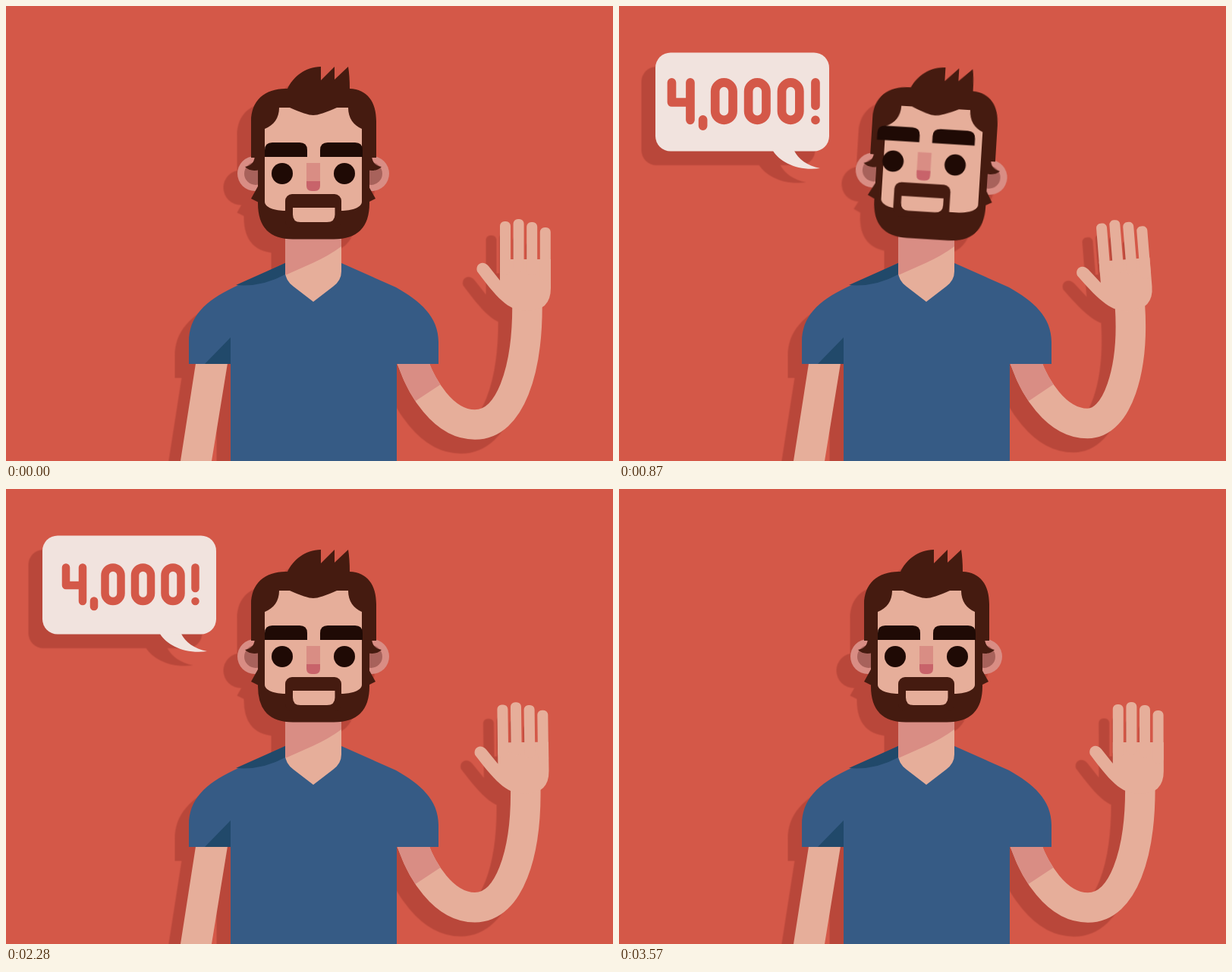
An HTML page that plays this animation: 800x600 px, repeating every 3600 ms.

```html
<!DOCTYPE html>
<html lang="en">
<head>
<meta charset="utf-8">
<title>Waving man</title>
<style>
  html, body { margin: 0; width: 100%; height: 100%; overflow: hidden; background: #d45848; }
  svg { display: block; width: 800px; height: 600px; }
  .skin { fill: #e6ae9a; }
  .shade { fill: #d98d84; }
  .hair { fill: #451b10; }
  .dark { fill: #1f0a05; }
  .shirt { fill: #365b85; }
  .fold { fill: #21496a; }
  .paper { fill: #f1e3de; }
  .line { fill: none; stroke: #e6ae9a; stroke-width: 39.5; }
  #armShade { stroke: #d98d84; stroke-dasharray: 61 999; }
  #label { fill: none; stroke: #d45848; stroke-width: 10.5; stroke-linecap: round; stroke-linejoin: round; }
</style>
</head>
<body>
<svg viewBox="0 0 800 600">
  <defs>
    <filter id="cast" filterUnits="userSpaceOnUse" x="0" y="0" width="800" height="600" color-interpolation-filters="sRGB">
      <feDropShadow dx="-18.5" dy="18.5" stdDeviation="0" flood-color="#b9473a"/>
    </filter>
    <g id="ear">
      <circle class="shade" cx="328" cy="221" r="23"/>
      <circle cx="329" cy="221" r="15" fill="#a8625b"/>
      <path class="hair" d="M334 194V216Q322 219 315 212Q328 210 328 196ZM333 236L323 254L333 259Z"/>
    </g>
    <path id="brow" class="dark" d="M341 199V190Q341 180 351 180H387Q397 180 397 190V199Z"/>
    <circle id="eye" class="dark" r="14"/>
    <rect id="zero" x="130.5" y="103.5" width="21" height="44.5" rx="10.5"/>
  </defs>

  <g filter="url(#cast)">
    <path id="tail" class="paper" d="M203 188V191C212 206 236 218 265 214C248 211 236 201 231 191V188Z"/>
    <rect id="box" class="paper" x="48" y="61.5" width="229" height="130" rx="20"/>
    <g id="label" role="img" aria-label="4,000!">
      <path d="M79 103.5V127H101M101 103.5V148M116 147.5V155M249.5 103.5V131M249.5 148V148.1"/>
      <use href="#zero"/>
      <use href="#zero" x="39.5"/>
      <use href="#zero" x="79"/>
    </g>

    <path id="arm" class="line"/>
    <path id="armShade" class="line"/>
    <g id="hand" class="skin">
      <path d="M651 334H718V372Q718 402 687 402C665 402 652 392 621 350C618 341 628 334 636 343L651 362Z"/>
    </g>

    <path class="skin" d="M251 465H293L271 600H230Z"/>
    <path class="shirt" d="M368 339L300 371C262 389 241 410 241 443V472H296V600H515V472H570V443C570 410 546 389 514 371L442 339Z"/>
    <path class="fold" d="M262 472L296 437V472ZM303 368L368 339V354Q337 371 303 368Z"/>
    <path class="skin" d="M368 290H442V350Q442 362 431 370L405 390L379 370Q368 362 368 350Z"/>
    <path class="shade" d="M368 290H442V317Q426 329 404 339L368 355Z"/>

    <g id="head">
      <use href="#ear"/>
      <use href="#ear" transform="matrix(-1 0 0 1 810 0)"/>
      <path class="hair" d="M323 200V152C323 124 342 108 371 109C378 94 394 80 415 80V98L433 80V97L451 80Q453 92 453 109C476 110 488 126 488 152V200H479V260Q479 307.5 432 307.5H378Q332 307.5 332 260V200Z"/>
      <path class="skin" d="M360 134H374Q396 144 405 144Q414 144 436 134H451C451 148 458 157 469 162V258C469 266 455 270 442 270H368C355 270 341 266 341 258V162C353 157 360 148 360 134Z"/>
      <g id="face">
        <path class="shade" d="M396 207H414V235H396Z"/>
        <path fill="#c8636a" d="M396 231H414V237Q414 244 407 244H403Q396 244 396 237Z"/>
        <g id="eyes">
          <use href="#eye" x="364"/>
          <use href="#eye" x="446"/>
        </g>
        <rect class="hair" x="368" y="248" width="74" height="45" rx="9"/>
        <path class="skin" d="M378 266H433.5V275Q433.5 285 423 285H388Q378 285 378 275Z"/>
        <g id="brows">
          <use href="#brow"/>
          <use href="#brow" transform="matrix(-1 0 0 1 811 0)"/>
        </g>
      </g>
    </g>
  </g>
</svg>

<script>
  const LOOP = 3600, WAVE = LOOP / 3;
  const $ = id => document.getElementById(id);
  const move = (id, value) => $(id).setAttribute('transform', value);
  const scaleAt = (x, y, s) => `translate(${x} ${y}) scale(${s}) translate(${-x} ${-y})`;

  const ease = p => (1 - Math.cos(Math.PI * Math.min(1, Math.max(0, p)))) / 2;
  const rise = (t, from, to) => ease((t - from) / (to - from));
  // Goes up from a to b, stays, and comes back from c to d.
  const hold = (t, a, b, c, d) => rise(t, a, b) - rise(t, c, d);
  // Grows past full size, then settles.
  const pop = t => 1.195 * rise(t, 0, 315) - 0.195 * rise(t, 315, 460);
  const blink = (t, middle) => ease(1 - Math.abs(t - middle) / 110);

  // Four fingers, the second one the longest.
  [284, 281, 285, 292].forEach((top, i) => {
    const finger = document.createElementNS('http://www.w3.org/2000/svg', 'rect');
    const box = { x: 651 + 17.6 * i, y: top, width: 14, height: 70, rx: 6 };
    for (const name in box) finger.setAttribute(name, box[name]);
    $('hand').append(finger);
  });

  function drawArm(t) {
    const swing = (1 - Math.cos(2 * Math.PI * t / WAVE)) / 2;
    const angle = -8 * swing, rad = angle * Math.PI / 180;
    const wrist = 687 - 23.5 * swing, low = 552 - 2.5 * swing;
    const d = `M530 455L537 472C547 500 575 ${low} ${618 - swing} ${low}` +
      `C${665 - 14 * swing} ${low} ${wrist - 68 * Math.sin(rad)} 480 ${wrist} 396`;
    $('arm').setAttribute('d', d);
    $('armShade').setAttribute('d', d);
    move('hand', `translate(${wrist} 396) rotate(${angle}) translate(-687 -396)`);
  }

  function drawHead(t) {
    const tilt = 3.6 * hold(t, 540, 900, 1350, 1800) - 2 * hold(t, 2280, 2600, 2700, 3300);
    const side = hold(t, 500, 880, 1350, 1780);
    const up = hold(t, 620, 880, 1350, 1780);
    const closed = blink(t, 700) + blink(t, 1620);
    move('head', `translate(0 ${2 * closed}) rotate(${tilt} 405 330)`);
    move('face', `translate(${-10.5 * side} ${-13.5 * up})`);
    move('brows', `translate(0 ${-5 * up})`);
    move('eyes', `translate(0 221) scale(1 ${1 - closed})`);
  }

  function drawBubble(t) {
    const s = Math.min(t, 3850 - t); // leaves the way it came
    move('box', scaleAt(162.5, 126.5, pop(s - 345)));
    move('label', scaleAt(164.5, 127, pop(s - 490)));
    move('tail', scaleAt(212, 188, rise(s, 690, 870)));
  }

  function frame() {
    const t = performance.now() % LOOP;
    drawArm(t);
    drawHead(t);
    drawBubble(t);
    requestAnimationFrame(frame);
  }
  frame();
</script>
</body>
</html>
```
